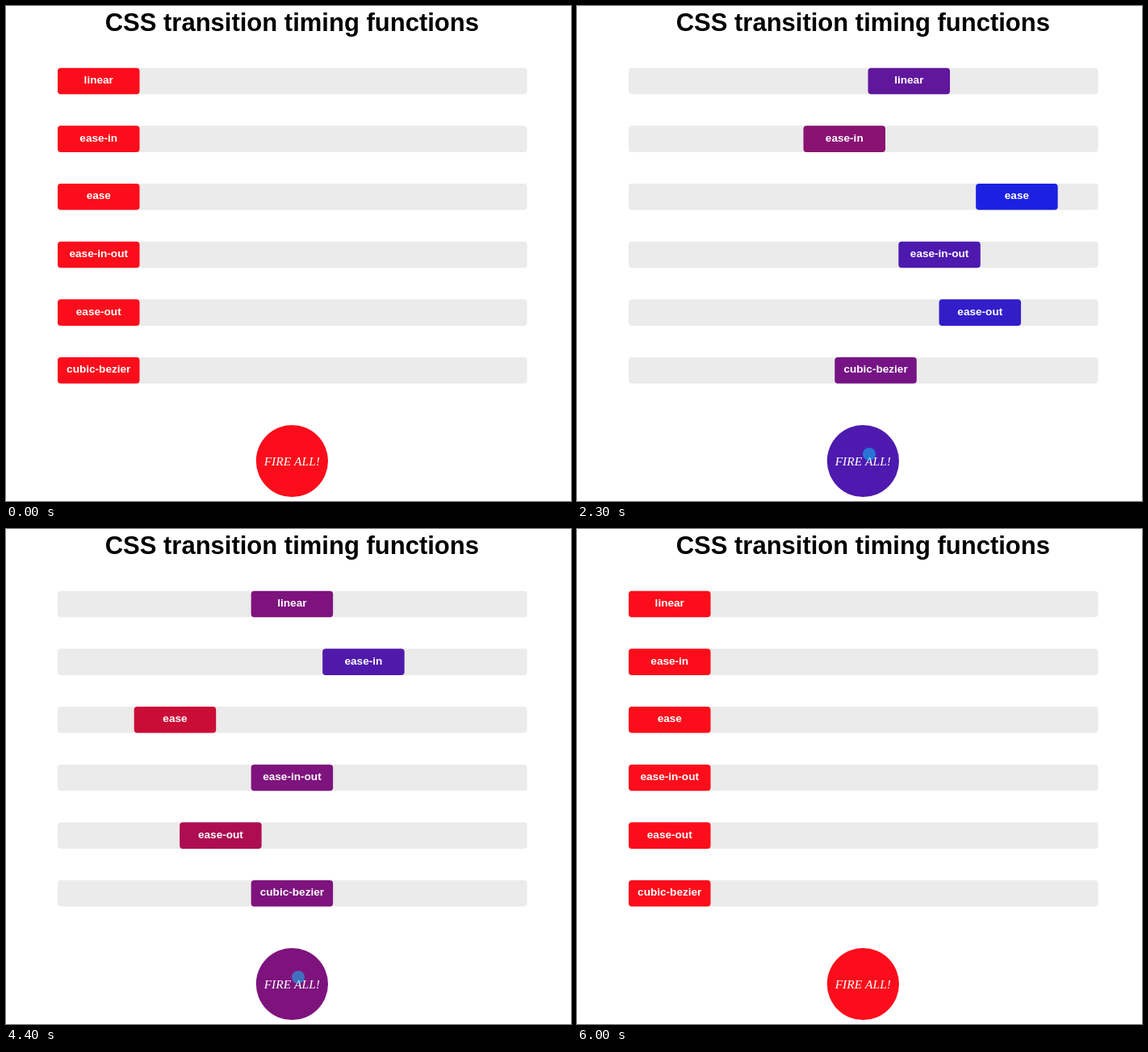
These frames come from a looping animation (700x613 px, 6.4 s). An HTML page with a canvas:

```html
<!DOCTYPE html>
<html lang="en">
<head>
<meta charset="utf-8">
<title>CSS transition timing functions</title>
<style>
  html, body { margin: 0; width: 100%; height: 100%; overflow: hidden; background: #fff; }
  canvas { display: block; }
</style>
</head>
<body>
<canvas id="stage" width="700" height="613"></canvas>
<script>
const ctx = document.getElementById('stage').getContext('2d');
const LOOP = 6400, STEP = 100;
const DURATION = 1390, FORWARD = 1440, BACK = 3705;
const LEFT = 64, TRAVEL = 479.3, BOX_WIDTH = 101.5, BAR_WIDTH = 581.6, BAR_HEIGHT = 32.6;
const RED = [252, 13, 27], BLUE = [11, 36, 251];
const SANS = '"Liberation Sans", Arial, sans-serif';
const SERIF = '"Liberation Serif", "Times New Roman", serif';

const clamp = v => Math.min(1, Math.max(0, v));
const mix = (a, b, p) => a + (b - a) * p;

function bezier(x1, y1, x2, y2) {
  const curve = (a, b, s) => 3 * a * s * (1 - s) ** 2 + 3 * b * s * s * (1 - s) + s ** 3;
  return x => {
    if (x <= 0 || x >= 1) return clamp(x);
    let low = 0, high = 1;
    for (let i = 0; i < 30; i++) {
      const mid = (low + high) / 2;
      if (curve(x1, x2, mid) < x) low = mid; else high = mid;
    }
    return curve(y1, y2, low);
  };
}

const easeInOut = bezier(0.42, 0, 0.58, 1);
const rows = [
  ['linear', x => x],
  ['ease-in', bezier(0.42, 0, 1, 1)],
  ['ease', bezier(0.25, 0.1, 0.25, 1)],
  ['ease-in-out', easeInOut],
  ['ease-out', bezier(0, 0, 0.58, 1)],
  ['cubic-bezier', bezier(0.2, 0.8, 0.8, 0.2)],
];

// Position between red (0) and blue (1) for a timing function
function progress(ease, t) {
  return t < BACK
    ? ease(clamp((t - FORWARD) / DURATION))
    : 1 - ease(clamp((t - BACK) / DURATION));
}

const blend = p =>
  `rgb(${RED.map((c, i) => Math.round(Math.hypot(c * (1 - p), BLUE[i] * p)))})`;

function text(str, x, y, font, color) {
  ctx.font = font;
  ctx.fillStyle = color;
  ctx.fillText(str, x, y);
}

function panel(x, y, width, color) {
  ctx.fillStyle = color;
  ctx.beginPath();
  ctx.roundRect(x, y, width, BAR_HEIGHT, 4);
  ctx.fill();
}

function disc(x, y, r, color) {
  ctx.fillStyle = color;
  ctx.beginPath();
  ctx.arc(x, y, r, 0, 2 * Math.PI);
  ctx.fill();
}

function pointerAt(t) {
  if (t < 200 || t >= 5600) return null;
  if (t >= 5500) return [401, 335];
  if (t >= 1500) return [362, 555];
  if (t >= 800) {
    const p = clamp((t - 800) / 500);
    return [mix(367, 358, p), mix(570, 575, p)];
  }
  const p = 1 - (1 - (t - 200) / 600) ** 2;
  return [mix(576, 367, p), mix(58, 570, p)];
}

function drawPointer(t) {
  const pos = pointerAt(t);
  if (!pos) return;
  const pressed = t === 1400 || t === 3600 || t === 3700;
  if (pressed) {
    ctx.strokeStyle = 'rgba(90, 110, 120, 0.6)';
    ctx.lineWidth = 1;
    ctx.beginPath();
    ctx.arc(...pos, 9, 0, 2 * Math.PI);
    ctx.stroke();
  } else {
    disc(...pos, 8, 'rgba(10, 198, 252, 0.52)');
  }
}

function draw(t) {
  ctx.fillStyle = '#fff';
  ctx.fillRect(0, 0, 700, 613);
  ctx.textAlign = 'center';
  text('CSS transition timing functions', 354.3, 31, `bold 31px ${SANS}`, '#000');

  rows.forEach(([label, ease], i) => {
    const y = 76.7 + i * 71.65;
    const p = progress(ease, t);
    const x = LEFT + TRAVEL * p;
    panel(LEFT, y, BAR_WIDTH, '#ebebeb');
    panel(x, y, BOX_WIDTH, blend(p));
    text(label, x + BOX_WIDTH / 2, y + 19.3, `bold 13.6px ${SANS}`, '#fff');
  });

  disc(354.4, 563.5, 44.6, blend(progress(easeInOut, t)));
  text('FIRE ALL!', 354.3, 568.7, `italic 15.5px ${SERIF}`, '#fff');
  drawPointer(t);
}

function frame() {
  const t = performance.now() % LOOP;
  draw(Math.floor(t / STEP) * STEP);
  requestAnimationFrame(frame);
}
frame();
</script>
</body>
</html>
```
